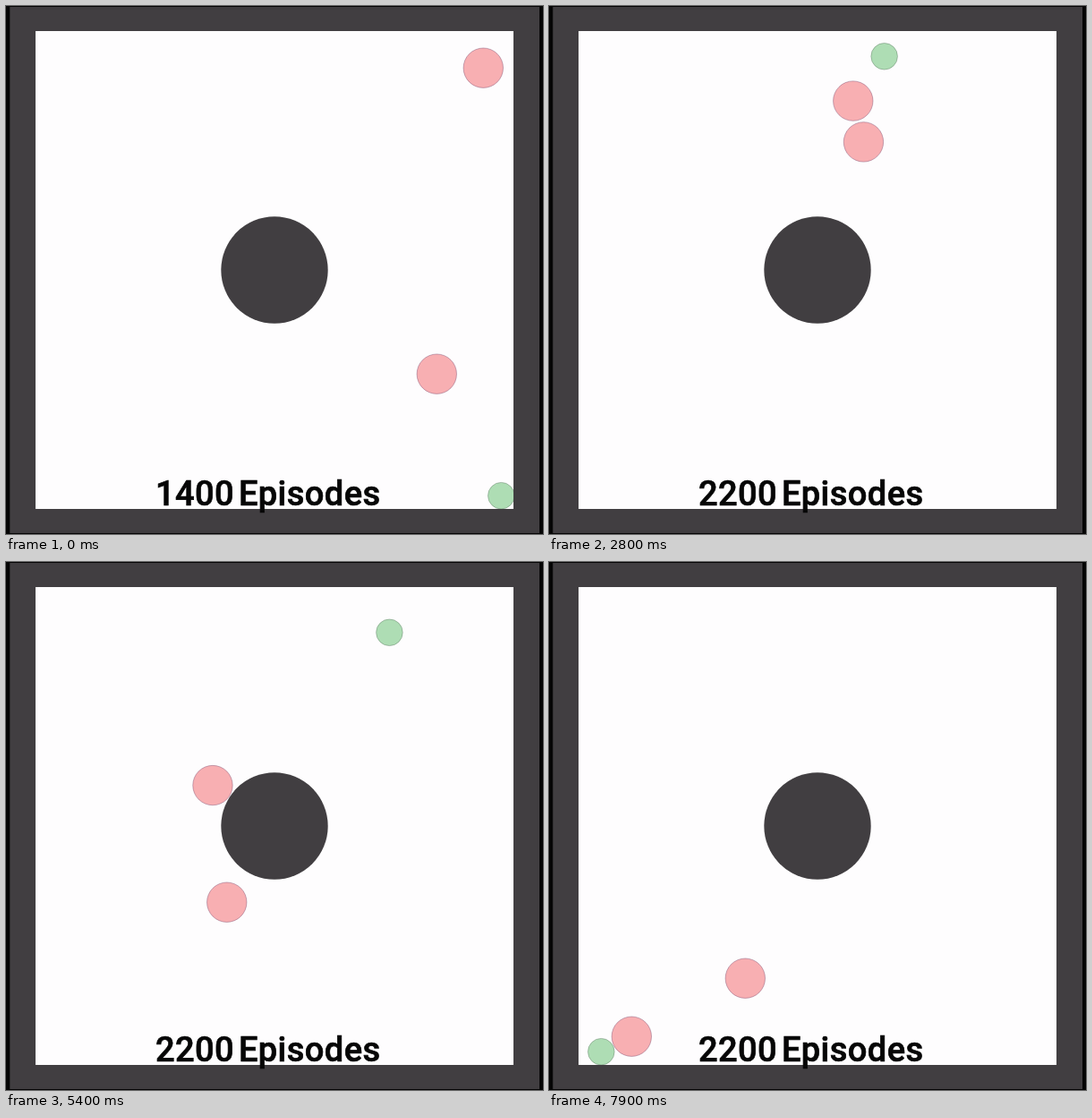
Animation of 600 by 590 pixels, one loop 8000 ms. Source, as an HTML page:

```html
<!DOCTYPE html>
<html lang="en">
<head>
<meta charset="utf-8">
<title>Pursuit training</title>
<style>
  html, body { margin: 0; width: 100%; height: 100%; overflow: hidden; background: #fefdfe; }
  svg { display: block; width: 600px; height: 590px; }
  text { font: 500 38px Roboto, sans-serif; letter-spacing: .4px; word-spacing: -5px; text-anchor: end;
         fill: #060606; stroke: #060606; stroke-width: .7px; }
  .chaser { fill: rgba(243, 99, 105, .5); stroke: rgba(120, 70, 105, .42); }
  .runner { fill: rgba(93, 189, 105, .5); stroke: rgba(80, 105, 85, .38); }
</style>
</head>
<body>
<svg viewBox="0 0 600 590">
  <rect width="600" height="590" fill="#fefdfe"/>
  <g transform="translate(.3 .2)">
    <circle class="chaser" r="22.2"/>
    <circle class="chaser" r="22.2"/>
    <circle class="runner" r="14.8"/>
  </g>
  <circle cx="300" cy="295" r="59.7" fill="#413e41"/>
  <path fill="#413e41" fill-rule="evenodd" d="M0 0H600V590H0ZM33 28V562H567V28Z"/>
  <path fill="#050505" fill-rule="evenodd" d="M0 0H600V590H0ZM4.3 1V589H596V1Z"/>
  <text x="418.5" y="558"></text>
</svg>
<script>
const LOOP = 8000, STEP = 100, CUT = 7;
const PILLAR = { x: 300, y: 295, gap: 83 };
const LAG = 1, PULL = .25;

// Key points as "step,x,y"
const route = s => s.split(" ").map(p => p.split(",").map(Number));

const first = {
  label: "1400 Episodes", end: 5,
  chasers: [route("0,533,69 1,520,51 5,456,108"), route("0,481,411 5,340,500")],
  runner: route("0,553,547 5,211,547")
};
const second = {
  label: "2200 Episodes", end: 79,
  chasers: [
    route("7,150,92 13,92,238 22,391,206 34,176,98 45,57,473 64,408,138 69,425,352 79,219,465"),
    route("7,290,130 13,209,293 22,428,278 34,184,148 45,81,538 51,69,535 58,400,385 64,450,113 69,480,375 79,92,530")
  ],
  runner: route("7,60,345 10,125,548 13,335,558 17,552,420 22,487,138 24,550,46 33,109,98 34,37,118 " +
    "45,69,547 51,247,106 53,385,44 58,547,250 62,450,45 64,388,169 69,551,451 71,500,546 77,47,548 79,58,547")
};

const clamp = (v, lo, hi) => Math.min(Math.max(v, lo), hi);

// Smooth curve through the key points; u is the progress between two of them
function along(pts, s) {
  let i = 0;
  while (i < pts.length - 2 && s >= pts[i + 1][0]) i++;
  const p = pts[i], q = pts[i + 1], d = q[0] - p[0];
  const u = clamp((s - p[0]) / d, 0, 1), v = 1 - u;
  const slope = (j, k) => {
    const a = pts[Math.max(j - 1, 0)], b = pts[Math.min(j + 1, pts.length - 1)];
    return (b[k] - a[k]) / (b[0] - a[0]);
  };
  const [x, y] = [1, 2].map(k => v * v * (1 + 2 * u) * p[k] + u * u * (3 - 2 * u) * q[k]
    + d * u * v * (v * slope(i, k) - u * slope(i + 1, k)));
  return { x, y, u };
}

// The runner may sink a little into the walls
function run(pts, s) {
  const { x, y } = along(pts, s);
  return { x: clamp(x, 37, 553), y: clamp(y, 42, 558) };
}

// Chasers lean towards the runner and slide around the pillar
function chase(pts, s, runner) {
  const p = along(pts, s), prey = run(runner, s - LAG);
  const pull = PULL * Math.sin(Math.PI * p.u);
  const dx = p.x + pull * (prey.x - p.x) - PILLAR.x;
  const dy = p.y + pull * (prey.y - p.y) - PILLAR.y;
  const push = Math.max(1, PILLAR.gap / Math.hypot(dx, dy));
  return { x: clamp(PILLAR.x + dx * push, 55, 545), y: clamp(PILLAR.y + dy * push, 49, 540) };
}

const circles = document.querySelectorAll("g circle");
const label = document.querySelector("text");

function draw(ms) {
  const step = Math.floor((ms % LOOP) / STEP);
  const scene = step < CUT ? first : second;
  const s = Math.min(step, scene.end);
  const places = [...scene.chasers.map(c => chase(c, s, scene.runner)), run(scene.runner, s)];
  places.forEach(({ x, y }, i) => {
    circles[i].setAttribute("cx", x.toFixed(2));
    circles[i].setAttribute("cy", y.toFixed(2));
  });
  label.textContent = scene.label;
}

let start;
function tick(now) {
  start ??= now;
  draw(now - start);
  requestAnimationFrame(tick);
}
draw(0);
requestAnimationFrame(tick);
</script>
</body>
</html>
```
